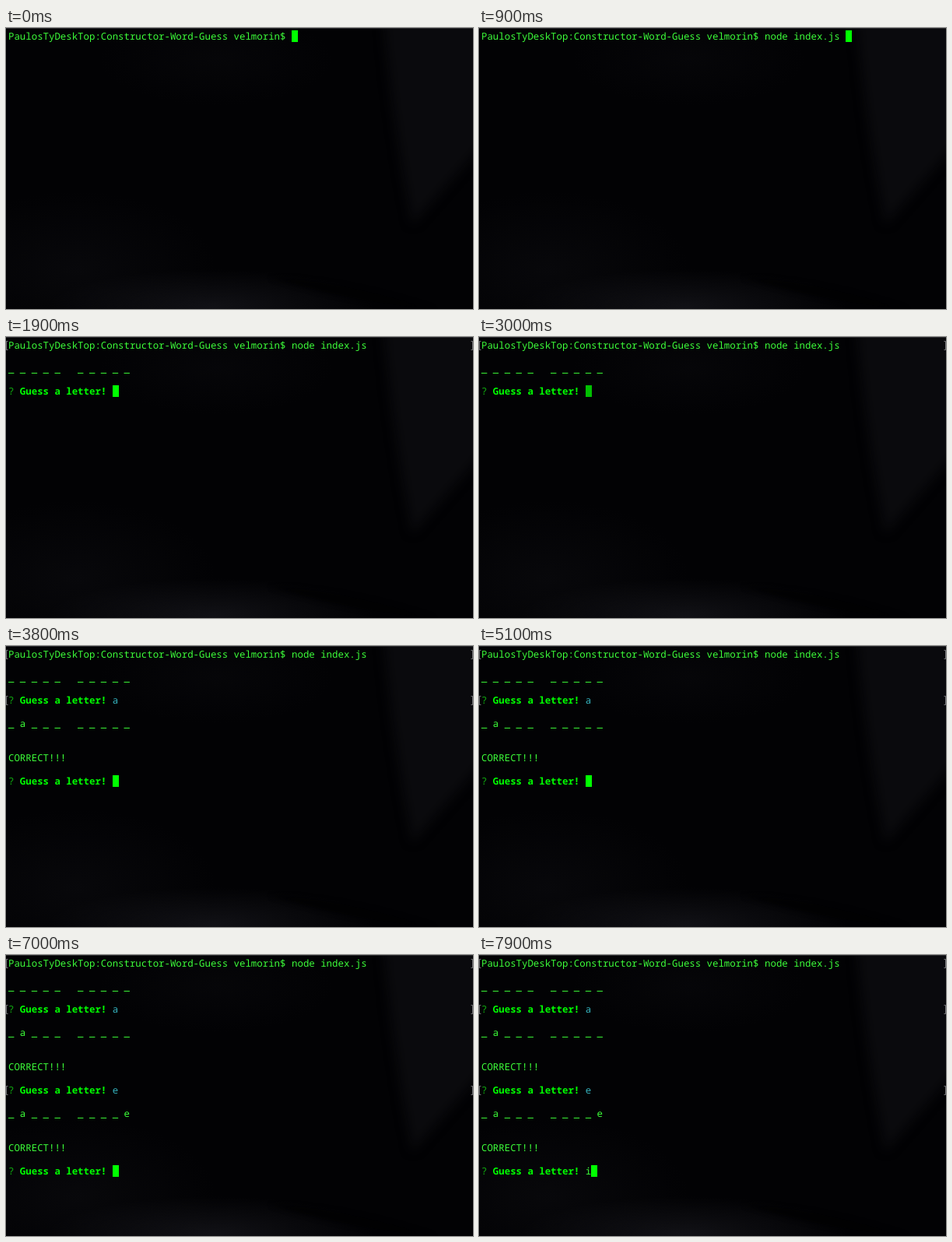
Write an HTML page that moves like this. It is 600 px wide and 361 px high and loops after 8000 ms.

```html
<!DOCTYPE html>
<html lang="en">
<head>
<meta charset="utf-8">
<title>Word guess terminal</title>
<style>
  html, body { margin: 0; width: 100%; height: 100%; overflow: hidden; background: #020204; }
  svg { display: block; width: 600px; height: 361px; }
  text {
    font: 500 12.38px "Noto Sans Mono", "DejaVu Sans Mono", monospace;
    white-space: pre;
    text-rendering: geometricPrecision;
    fill: #3dff3a;
  }
  .bold { font-weight: 700; fill: #00ff00; }
  .mark { fill: #10b010; }
  .reply { fill: #36b4c0; }
  .bracket { fill: none; stroke: #77777a; stroke-width: 1; }
</style>
</head>
<body>
<svg viewBox="0 0 600 361" xmlns="http://www.w3.org/2000/svg">
  <defs>
    <radialGradient id="glow">
      <stop offset="0" stop-color="#15151a"/>
      <stop offset="1" stop-color="#15151a" stop-opacity="0"/>
    </radialGradient>
    <filter id="soft" color-interpolation-filters="sRGB"><feGaussianBlur stdDeviation="7"/></filter>
    <filter id="crisp" color-interpolation-filters="sRGB"><feGaussianBlur stdDeviation="3"/></filter>
  </defs>
  <rect width="600" height="361" fill="#020204"/>
  <ellipse cx="270" cy="40" rx="150" ry="60" fill="url(#glow)" opacity=".2"/>
  <ellipse cx="90" cy="310" rx="180" ry="100" fill="url(#glow)" opacity=".3"/>
  <ellipse cx="265" cy="358" rx="210" ry="48" fill="url(#glow)" opacity=".8"/>
  <path d="M484 -20H630V130L522 252Q496 120 484 -20Z" fill="#0a0a0d" filter="url(#soft)"/>
  <path d="M340 320Q440 326 550 362Q430 350 340 320Z" fill="#010102" filter="url(#crisp)"/>
  <rect width="600" height="1" fill="#2b2b2e"/>
  <g id="screen"></g>
  <rect id="cursor" width="8" height="15" fill="#00ff00"/>
</svg>
<script>
const LOOP = 8000, STEP = 100, CELL = 7.43, ROW = 14.83;
const screen = document.getElementById('screen');
const cursor = document.getElementById('cursor');
const items = [];
const colX = col => 3 + col * CELL;
const rowY = row => Math.round(2.6 + row * ROW);

function add(tag, attrs, from, to = LOOP) {
  const el = document.createElementNS('http://www.w3.org/2000/svg', tag);
  for (const key in attrs) el.setAttribute(key, attrs[key]);
  screen.append(el);
  items.push({ el, from, to });
  return el;
}

function print(text, row, col, from, cls = 'plain', to = LOOP) {
  add('text', { x: colX(col), y: 15 + row * ROW, class: cls }, from, to).textContent = text;
}

// Marks at both window edges of an entered line
function bracket(row, from) {
  const y = rowY(row) + 2.5;
  add('path', { d: `M2.5 ${y}H.5v11h2M597.5 ${y}h2v11h-2`, class: 'bracket' }, from);
}

function ask(row, from, letter, typed, entered) {
  print('?', row, 0, from, 'mark');
  print('Guess a letter!', row, 2, from, 'bold');
  print(letter, row, 18, typed, 'plain', entered);
  if (entered < LOOP) {
    print(letter, row, 18, entered, 'reply');
    bracket(row, entered);
  }
}

print('PaulosTyDeskTop:Constructor-Word-Guess velmorin$', 0, 0, 0);

const typing = ['no', 'node', 'node ', 'node in', 'node index.js '];
typing.forEach((text, i) => {
  const from = 300 + i * STEP;
  print(text, 0, 49, from, 'plain', i < typing.length - 1 ? from + STEP : LOOP);
});
bracket(0, 1000);

print('_ _ _ _ _   _ _ _ _ _', 2, 0, 1200);
ask(4, 1200, 'a', 3200, 3400);
print('_ a _ _ _   _ _ _ _ _', 6, 0, 3400);
print('CORRECT!!!', 9, 0, 3400);
ask(11, 3400, 'e', 5600, 5900);
print('_ a _ _ _   _ _ _ _ e', 13, 0, 5900);
print('CORRECT!!!', 16, 0, 5900);
ask(18, 5900, 'i', 7900, LOOP);

// Cursor: time, row, column, fade (-1 out, 1 in, 0 solid)
const moves = [
  [0, 0, 49, 0],
  ...typing.map((text, i) => [300 + i * STEP, 0, 49 + text.length, 0]),
  [1000, 1, 0, 0],
  [1200, 4, 18, 0], [2300, 4, 18, -1], [2800, 4, 18, 1], [3200, 4, 19, 0],
  [3400, 11, 18, 0], [4300, 11, 18, -1], [4800, 11, 18, 1], [5300, 11, 18, -1], [5600, 11, 19, 0],
  [5900, 18, 18, 0], [7300, 18, 18, -1], [7800, 18, 18, 1], [7900, 18, 19, 0]
];

function level(fade, age) {
  if (fade < 0) return Math.max(0, 1 - (age + STEP) / 300);
  if (fade > 0) return Math.min(1, (age + STEP) / 400);
  return 1;
}

function draw(now) {
  const t = Math.floor((now % LOOP) / STEP) * STEP;
  for (const { el, from, to } of items) {
    el.style.display = t >= from && t < to ? '' : 'none';
  }
  const [start, row, col, fade] = moves.filter(move => move[0] <= t).pop();
  cursor.setAttribute('x', Math.round(colX(col)));
  cursor.setAttribute('y', rowY(row));
  cursor.setAttribute('opacity', level(fade, t - start));
}

let begin;
function tick(now) {
  begin ??= now;
  draw(Math.max(0, now - begin));
  requestAnimationFrame(tick);
}
draw(0);
requestAnimationFrame(tick);
</script>
</body>
</html>
```
